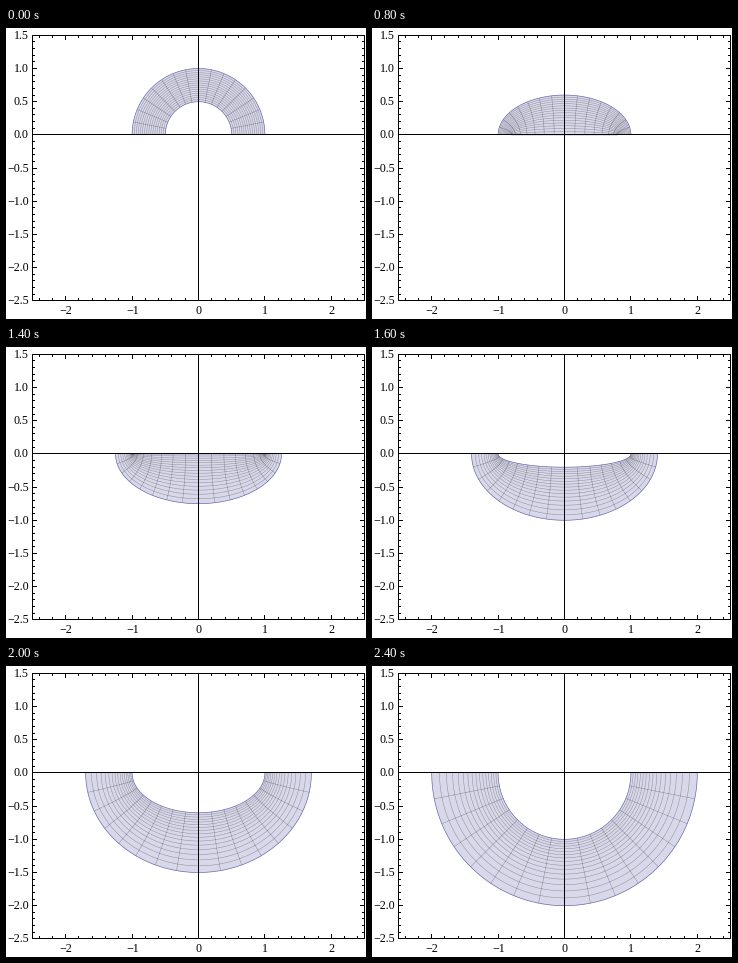
A matplotlib script for the animation above (2900 ms loop, 360 by 291 pixels).

```python
import numpy as np
import matplotlib.pyplot as plt
from matplotlib.animation import FuncAnimation
from matplotlib.collections import LineCollection
from matplotlib.patches import Polygon, Rectangle

W, H, DPI = 360, 291, 72
SCALE, X0, Y0 = 66.4, 192.5, 106.9
LEFT, RIGHT, TOP, BOTTOM = 26.5, 358.5, 7.5, 272.5
BLUE = (0.2472, 0.24, 0.6)
STEPS, HOLD, FRAMES = 20, 4, 29
CELLS = 16

fig = plt.figure(figsize=(W / DPI, H / DPI), dpi=DPI, facecolor="white")
ax = fig.add_axes([0, 0, 1, 1])
ax.set_xlim(0, W)
ax.set_ylim(H, 0)
ax.axis("off")


def snap(v):
    """Centre of the pixel that holds v."""
    return np.floor(v) + 0.5


def px(x):
    return X0 + SCALE * x


def py(y):
    return Y0 - SCALE * y


def label(x, y, text, align):
    ax.text(x, y, text.replace("-", "\u2212"), family="Liberation Serif",
            fontsize=12, ha=align, va="baseline", color="black", zorder=6)


def add_lines(segments, color, width, zorder):
    lines = LineCollection(segments, colors=[color], linewidths=width,
                           zorder=zorder, snap=False)
    return ax.add_collection(lines, autolim=False)


def draw_frame():
    ticks = []
    for i in range(-12, 13):
        x, major = snap(px(i / 5)), i % 5 == 0
        size = 4.5 if major else 2.5
        ticks += [[(x, TOP), (x, TOP + size)], [(x, BOTTOM), (x, BOTTOM - size)]]
        if major:
            label(x, 286, str(i // 5), "center")
    for i in range(-25, 16):
        y, major = snap(py(i / 10)), i % 5 == 0
        size = 4.5 if major else 2.5
        ticks += [[(LEFT, y), (LEFT + size, y)], [(RIGHT, y), (RIGHT - size, y)]]
        if major:
            label(22.5, y + 3.5, f"{i / 10:.1f}", "right")
    x, y = snap(px(0)), snap(py(0))
    ticks += [[(LEFT, y), (RIGHT, y)], [(x, TOP), (x, BOTTOM)]]
    add_lines(ticks, "black", 1, 5)
    ax.add_patch(Rectangle((LEFT, TOP), RIGHT - LEFT, BOTTOM - TOP, fill=False,
                           ec="black", lw=1, zorder=5, snap=False))


# Half annulus 0.5 <= |z| <= 1 in the upper half plane
radii = np.linspace(0.5, 1, CELLS + 1)
angles = np.linspace(0, np.pi, CELLS + 1)
fine_r = np.linspace(0.5, 1, 41)
fine_a = np.linspace(0, np.pi, 121)
arcs = [r * np.exp(1j * fine_a) for r in radii]
spokes = [fine_r * np.exp(1j * a) for a in angles[1:-1]]
outline = np.concatenate([arcs[-1], -fine_r[::-1], arcs[0][::-1], fine_r])

fill = ax.add_patch(Polygon([(0, 0), (1, 1)], fc=BLUE, ec="none", alpha=0.2, zorder=1))
mesh = add_lines([], (0, 0, 0, 0.34), 0.5, 2)
edges = add_lines([], (*BLUE, 0.8), 0.65, 3)
draw_frame()


def morph(z, t):
    """Blend from z to 1/z, in pixels."""
    w = (1 - t) * z + t / z
    return np.column_stack([px(w.real), py(w.imag)])


def update(n):
    t = np.clip(n - HOLD, 0, STEPS) / STEPS
    fill.set_xy(morph(outline, t))
    mesh.set_segments([morph(z, t) for z in arcs[1:-1] + spokes])
    edges.set_segments([morph(arcs[0], t), morph(arcs[-1], t)])
    return fill, mesh, edges


anim = FuncAnimation(fig, update, frames=FRAMES, interval=100, repeat=True,
                     repeat_delay=0, blit=False)
plt.show()
```
